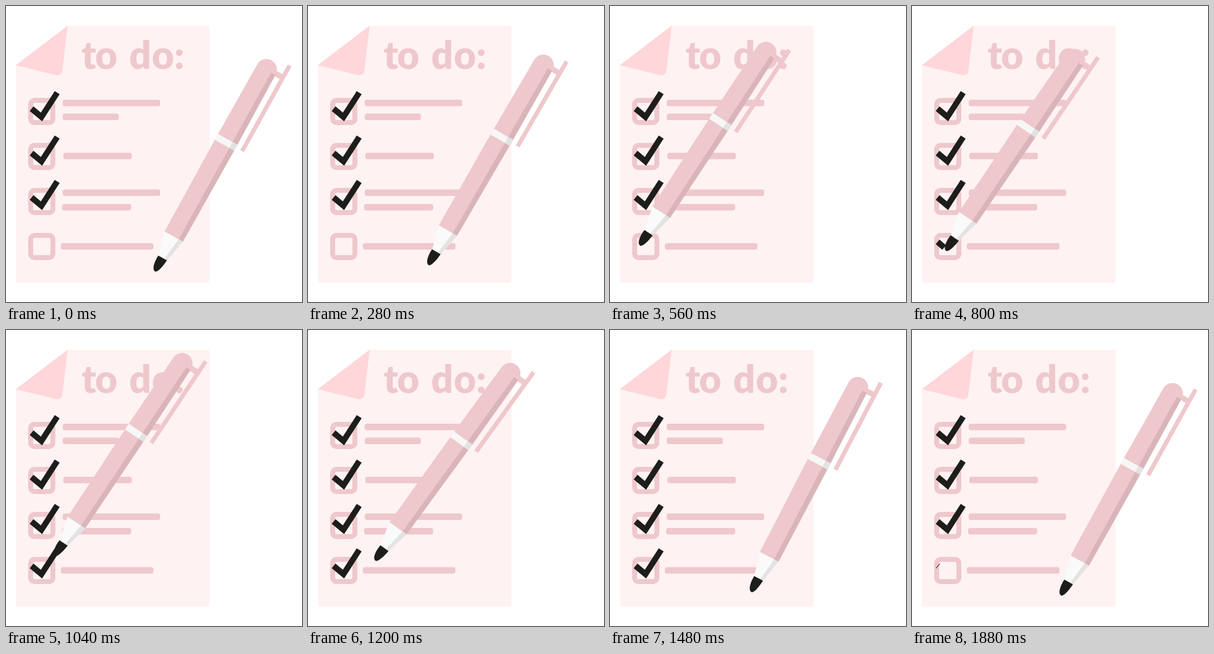
Write an HTML page that moves like this. It is 480x480 px and loops after 1920 ms.

```html
<!DOCTYPE html>
<html lang="en">
<head>
<meta charset="utf-8">
<title>To do</title>
<style>
  html, body { margin: 0; width: 100%; height: 100%; overflow: hidden; background: #fff; }
  svg { display: block; width: 100vw; height: 100vh; }
  text { font: 900 62px Lato, "Open Sans", sans-serif; text-anchor: middle; }
  .pink { fill: #eec8cc; }
  .box { fill: none; stroke: #eec8cc; stroke-width: 8; }
  .check { fill: none; stroke: #1d1d1b; stroke-width: 9.5; stroke-miterlimit: 10; }
</style>
</head>
<body>
<svg viewBox="0 0 480 480">
  <path fill="#fff2f2" d="M100 32H327Q330 32 330 35V444Q330 449 325 449H21Q16 449 16 444V96Z"/>
  <path fill="#ffd6d9" d="M100 32L91.500 104Q90 114 81 112L16 96Z"/>
  <text class="pink" y="102" x="134.500 162.500 190 217.500 254.500 281">to do:</text>
  <g id="list"></g>
  <!-- The pen's origin is its tip; it points straight down before rotation. -->
  <g id="pen">
    <path class="pink" d="M26.300 -398H33.300V-239H26.300V-371H14V-380H26.300Z"/>
    <path class="pink" d="M-17 -64L-18 -239L-17 -374A17 17 0 0 1 17 -374L18 -239L17 -64Z"/>
    <path fill="#d9b5b9" d="M9 -373H17L18 -239L17 -64H9Z"/>
    <path fill="#f7f7f7" d="M-18 -244.500H18V-233.500H-18Z"/>
    <path fill="#e3e3e3" d="M9 -244.500H18V-233.500H9Z"/>
    <path fill="#fafafa" d="M-17 -64H17L9 -25H-7Z"/>
    <path fill="#e3e3e3" d="M9 -64H17L9 -25H4Z"/>
    <path fill="#1d1d1b" d="M-7 -25H9C8 -12 5 0 1 0C-5 0 -8 -12 -7 -25Z"/>
  </g>
</svg>
<script>
const LOOP = 1920, STEP = 40, CHECK_LENGTH = 69;
const list = document.getElementById('list');
const pen = document.getElementById('pen');

function add(tag, attrs) {
  const el = document.createElementNS('http://www.w3.org/2000/svg', tag);
  for (const name in attrs) el.setAttribute(name, attrs[name]);
  return list.appendChild(el);
}

// x, y, width
const lines = [[92, 152, 158], [92, 174.5, 91], [93, 238, 111],
               [92, 297.5, 158], [91, 321, 112], [89, 384.5, 150]];
for (const [x, y, width] of lines)
  add('rect', { class: 'pink', x, y, width, height: 10.5, rx: 3.5 });

let lastCheck;
for (let i = 0; i < 4; i++) {
  add('rect', { class: 'box', x: 40, y: 153 + 73 * i, width: 36, height: 36, rx: 6 });
  lastCheck = add('path', { class: 'check', d: `M41.5 ${166.5 + 72 * i}l16 13.500l25.500 -39.500` });
}

// time, tip x, tip y, angle
const keys = [
  [200, 241, 430, 29],
  [400, 80.5, 394.5, 32.4],
  [560, 48, 388, 33.2],
  [740, 40, 387, 33.8],
  [800, 54.5, 396.5, 34],
  [880, 63, 390, 34.2],
  [1040, 78.7, 365.7, 33.6],
  [1320, 137.5, 384.7, 36.6],
  [1400, 178, 397, 31],
  [1480, 228.5, 424.5, 27.6],
  [1640, 241, 430, 29]
];

function slope(i, part) {
  if (i === 0 || i === keys.length - 1) return 0;
  const a = keys[i - 1], b = keys[i + 1];
  return (b[part] - a[part]) / (b[0] - a[0]);
}

// Cubic Hermite curve through the keys, held at both ends.
function pose(time) {
  const t = Math.min(Math.max(time, keys[0][0]), keys[keys.length - 1][0]);
  const i = Math.max(1, keys.findIndex(key => key[0] >= t));
  const a = keys[i - 1], b = keys[i], h = b[0] - a[0], p = (t - a[0]) / h;
  const ease = p * p * (3 - 2 * p);
  return [1, 2, 3].map(part =>
    a[part] + (b[part] - a[part]) * ease +
    h * p * (1 - p) * ((1 - p) * slope(i - 1, part) - p * slope(i, part)));
}

function draw(now) {
  const t = Math.floor(now % LOOP / STEP) * STEP;
  const [x, y, angle] = pose(t);
  pen.setAttribute('transform', `translate(${x} ${y}) rotate(${angle})`);

  const drawn = Math.max(0, Math.min(CHECK_LENGTH, (t - 744) / 4, (1884 - t) / 4));
  lastCheck.style.visibility = drawn ? 'visible' : 'hidden';
  lastCheck.style.strokeDasharray = `${drawn} 200`;
}

const start = performance.now();
function tick() {
  draw(performance.now() - start);
  requestAnimationFrame(tick);
}
tick();
</script>
</body>
</html>
```
